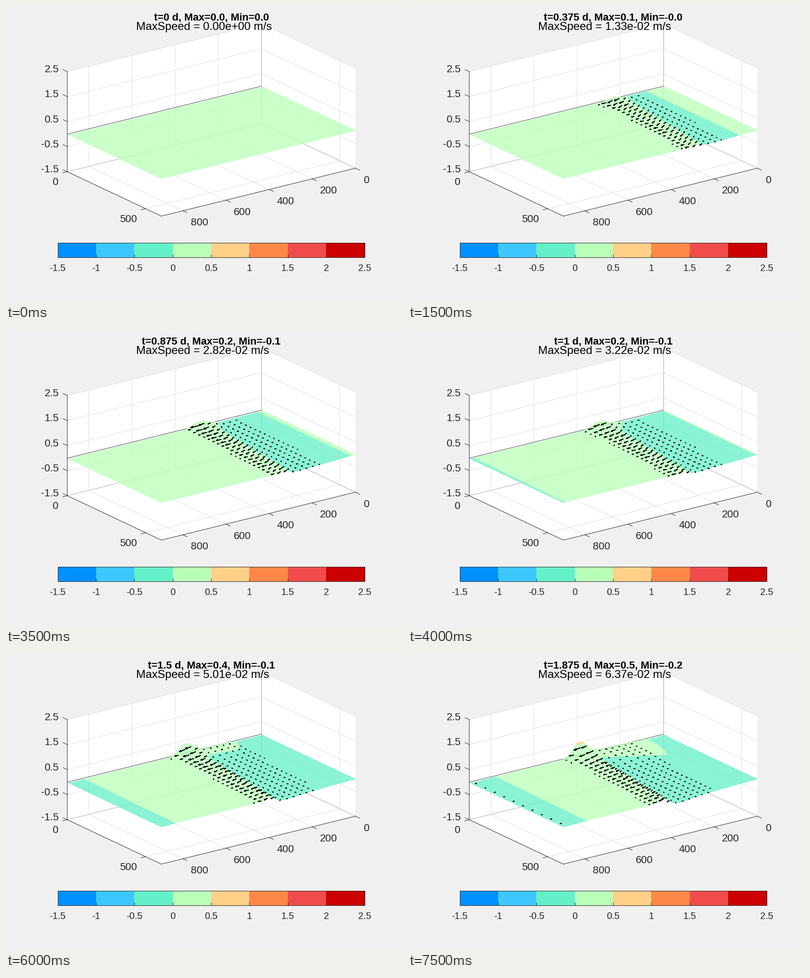
These frames come from a looping animation (840x630 px, 8000 ms). A matplotlib script:

```python
import numpy as np
import matplotlib.pyplot as plt
from matplotlib.animation import FuncAnimation
from matplotlib.collections import LineCollection
from matplotlib.patches import Rectangle

W, H, DPI = 840, 630, 100
FRAMES, INTERVAL = 16, 500
PX = 72 / DPI
LX, LY = 900, 600
INK, GRID, EDGE = "#262626", "#dfdfdf", "#bdbdbd"
COLORS = ["#0090ff", "#3cc8ff", "#64f0c8", "#b9ffb9",
          "#ffd088", "#ff8848", "#f04c4c", "#cc0000"]
LEVELS = np.arange(-1.5, 2.51, 0.5)

plt.rcParams["font.family"] = "Liberation Sans"
fig = plt.figure(figsize=(W / DPI, H / DPI), dpi=DPI, facecolor="#f0f0f0")
ax = fig.add_axes([0, 0, 1, 1])
ax.axis("off")


def project(x, y, z):
    """Orthographic view of the basin, in pixels."""
    return (541 - 411.5 * x / LX + 199.5 * y / LY,
            250.2 + 102 * x / LX + 94.5 * y / LY - 53.3 * (z + 1.5))


def line(*pts, color=GRID, z=1):
    xs, ys = zip(*pts)
    ax.plot(xs, ys, color=color, lw=PX, zorder=z)


def line3(*pts, color=GRID, z=1):
    line(*(project(*p) for p in pts), color=color, z=z)


def label(x, y, s, size=22, ha="center", **kw):
    return ax.text(x, y, s, fontsize=size * PX, ha=ha, va="baseline",
                   zorder=9, **{"color": INK, **kw})


def tick(p, dx, dy):
    line(p, (p[0] + dx, p[1] + dy), color=INK, z=3)


def draw_box():
    lo, hi = -1.5, 2.5
    outline = [(LX, 0, lo), (LX, 0, hi), (0, 0, hi), (0, LY, hi),
               (0, LY, lo), (LX, LY, lo)]
    ax.fill(*zip(*(project(*p) for p in outline)), color="white", lw=0, zorder=0)
    for z in LEVELS[::2]:
        line3((LX, 0, z), (0, 0, z), (0, LY, z))
    for x in range(0, LX, 200):
        line3((x, 0, hi), (x, 0, lo), (x, LY, lo))
    for y in (0, 500):
        line3((0, y, hi), (0, y, lo), (LX, y, lo))
    line3((LX, 0, lo), (0, 0, lo), (0, LY, lo), color=EDGE)
    line3((0, 0, lo), (0, 0, hi), color=EDGE)
    line3((LX, 0, 0), (0, 0, 0), color="#444444", z=2)
    line3((LX, 0, hi), (LX, 0, lo), (LX, LY, lo), (0, LY, lo), color=INK, z=3)

    for z in LEVELS[::2]:
        p = project(LX, 0, z)
        tick(p, -9, -4.2)
        label(111.5, p[1] + 1.5, f"{z:.1f}", ha="right")
    for x in range(0, LX, 200):
        p = project(x, LY, lo)
        tick(p, 9, 4.2)
        label(p[0] + (35 if x else 23), p[1] + 31.5, str(x))
    for y in (0, 500):
        p = project(LX, y, lo)
        tick(p, -9.7, 2.4)
        label(p[0] - (37 if y else 26), p[1] + 28.5, str(y))


def draw_colorbar():
    left, top, wide, high = 109, 503, 651, 31
    step = wide / len(COLORS)
    for i, c in enumerate(COLORS):
        ax.add_patch(Rectangle((left + i * step, top), step, high,
                               fc=c, lw=0, antialiased=False))
    ax.add_patch(Rectangle((left, top), wide, high, fc="none", ec=INK, lw=PX, zorder=3))
    for i, v in enumerate(LEVELS):
        x = left + i * step
        line((x, top + high), (x, top + high - 6), color=INK, z=3)
        label(x, 563, f"{v:g}", size=20)


def peak(t):
    return 0.235 * t ** 1.35


def trough(t):
    return 0.095 * t


def front(y, t):
    return 153 + 101 * t + y / 9


def crest(y, t):
    return front(y, t) + 25 + 35 * np.exp(-y / 80)


def height(x, y, t):
    """Sea level: wind trough, crest ahead of it and a coastal bump."""
    if t == 0:
        return 1e-4 + 0 * (x + y)
    m = trough(t)
    s = x - front(y, t)

    # positive lobe trailing along the coast
    tip = 160 + 101 * t
    rear = min(325 - 132 * t, tip - 45)
    reach = 60 * min(t, 1) + (t - 1.3) * (tip - x)
    reach = np.maximum(reach, 0) * np.sqrt(np.clip((x - rear) / 45, 0, 1))
    side = np.tanh((y - reach) / 40)
    side = np.where(side < 0, 0.5 * side, side)

    back = np.minimum(s, 0)
    dip = (1 - np.exp(back / 25)) * np.exp(back / 150) / 0.62
    dip = dip * side * np.tanh((x - 130 + 125 * t) / 60)

    ahead = np.maximum(s, 0) / 18
    h = m * (0.5 * ahead * np.exp(1 - ahead) - dip)

    d = x - crest(y, t)
    width = np.where(d > 0, 30, 36)
    h = h + (peak(t) - 0.16 * m) * np.exp(-(y - 10) / 45 - (d / width) ** 2 / 2)

    # drawdown spreading from the far end
    edge = 885 - 115 * (t - 1) + y / 75
    return h + 1e-4 - 0.01 * np.clip((x - edge) / 40, 0, 1)


GX, GY = np.meshgrid(np.linspace(0, LX, 226), np.linspace(10, LY, 149))
AX, AY = np.meshgrid(np.arange(15, LX, 30.0), np.arange(25, LY, 30.0))


def arrows(t):
    if t == 0:
        return []
    d = AX - crest(AY, t)
    core = np.exp(-(d / 48) ** 2) * (0.6 + 0.4 * np.exp(-AY / 100))
    wake = 0.38 / (1 + 0.7 * t) * np.exp(np.minimum(d, 0) / (40 + 110 * t))
    wake = wake * (d < 20)
    far = 0.1 * ((AX == 885) & (AY % 60 < 30)) * (t > 1.7)
    u = core - 0.5 * wake + far
    v = 0.9 * wake
    keep = np.hypot(u, v) > 0.065

    x, y, u, v = (a[keep] for a in (AX, AY, u, v))
    reach = 40
    x2, y2 = x + reach * u, y + reach * v
    z = height(x, y, t)
    p = np.array(project(x, y, z)).T
    q = np.array(project(x2, y2, z)).T
    back = (p - q) * 0.3
    normal = back[:, ::-1] * [-0.35, 0.35]
    return np.stack([p, q, q + back + normal, q, q + back - normal], axis=1)


KNOTS = [0, 0.125, 0.25, 0.375, 0.625, 1, 1.25, 1.625, 1.875]
SPEEDS = [0, 0.0048, 0.0093, 0.0133, 0.0203, 0.0322, 0.0410, 0.0547, 0.0637]

draw_box()
draw_colorbar()
title = label(435, 30, "", weight="bold", color="black")
subtitle = label(275, 50.5, "", size=24, ha="left", color="black")
quiver = LineCollection([], colors="black", linewidths=PX, zorder=6,
                        antialiaseds=False, capstyle="projecting")
ax.add_collection(quiver, autolim=False)
sheet = []


def update(i):
    t = i * 0.125
    while sheet:
        sheet.pop().remove()
    z = height(GX, GY, t)
    sheet.append(ax.contourf(*project(GX, GY, z), z, levels=LEVELS, colors=COLORS,
                             alpha=0.75, zorder=4))
    ax.set_xlim(-0.5, W - 0.5)
    ax.set_ylim(H - 0.5, -0.5)
    quiver.set_segments(arrows(t))
    title.set_text(f"t={t:g} d, Max={peak(t):.1f}, Min={0 - trough(t):.1f}")
    subtitle.set_text(f"MaxSpeed = {np.interp(t, KNOTS, SPEEDS):.2e} m/s")
    return [title, subtitle, quiver]


anim = FuncAnimation(fig, update, frames=FRAMES, interval=INTERVAL,
                     repeat=True, repeat_delay=0, blit=False)
plt.show()
```
